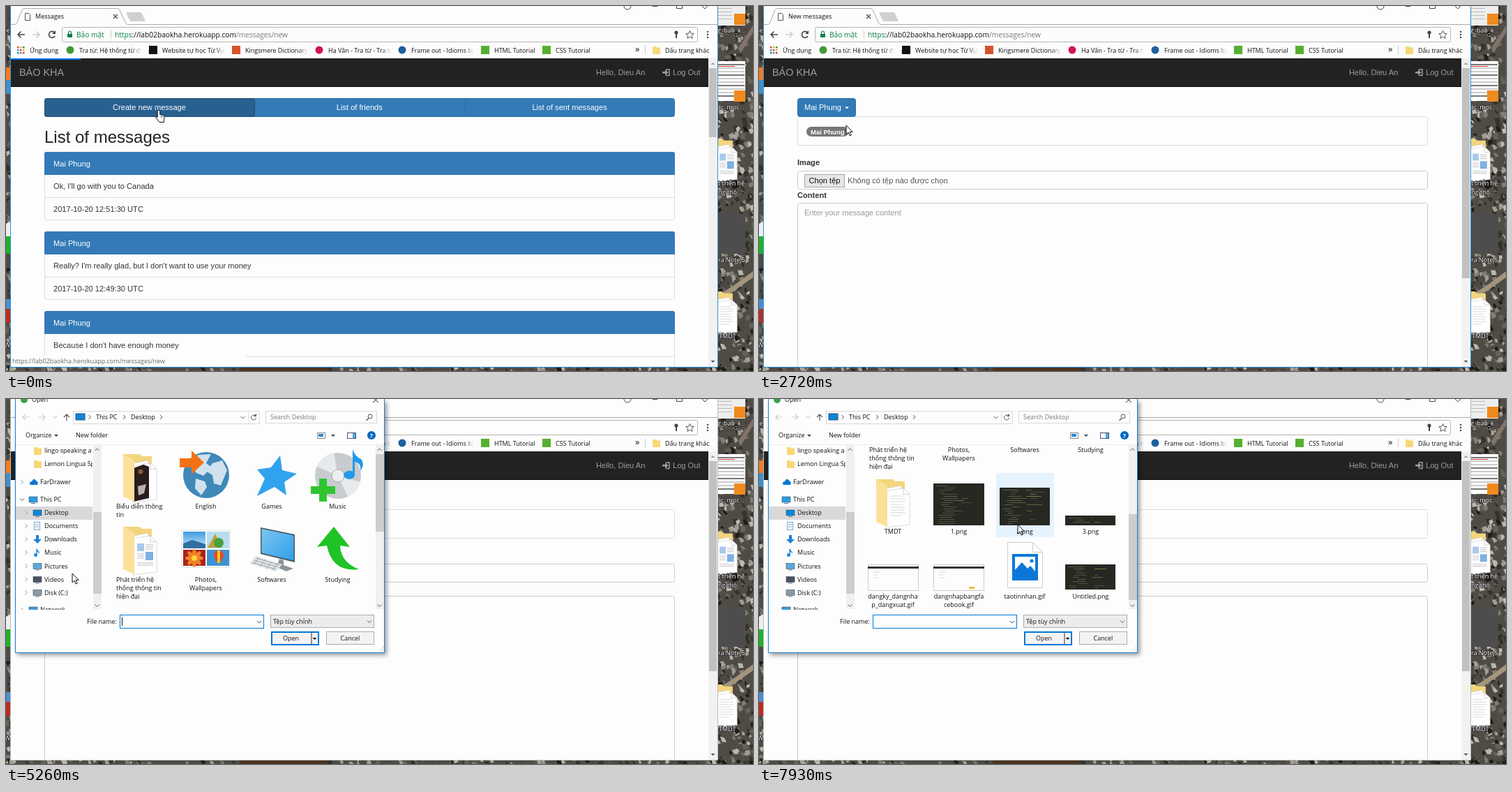
An HTML page for the animation above (8 s loop, 1071x523 px).

```html
<!DOCTYPE html>
<html lang="vi">
<head>
<meta charset="utf-8">
<title>New messages</title>
<style>
html, body { margin: 0; width: 100%; height: 100%; overflow: hidden; background: #fff; }
svg { display: block; width: 1071px; height: 523px; }
text { font: 11.1px "Liberation Sans", Arial, sans-serif; fill: #333; white-space: pre; }
.u { font: 9px "Open Sans", "Noto Sans", sans-serif; fill: #111; }
.url { font-size: 10.2px; }
.b { font-weight: bold; }
.w { fill: #fff; }
.g { fill: #9d9d9d; }
.m { text-anchor: middle; }
.badge { font-size: 9.6px; font-weight: bold; fill: #fff; text-anchor: middle; }
</style>
</head>
<body>
<svg id="stage" viewBox="0 0 1071 523">
  <defs>
    <linearGradient id="fade"><stop stop-color="#fcfcfc" stop-opacity="0"/><stop offset="1" stop-color="#fcfcfc"/></linearGradient>
    <linearGradient id="sky" x2="0" y2="1"><stop stop-color="#3c9be0"/><stop offset="1" stop-color="#cfe8f8"/></linearGradient>
    <linearGradient id="screen" x2="1" y2="1"><stop stop-color="#7cc6f2"/><stop offset="1" stop-color="#2f9fe8"/></linearGradient>
    <filter id="soft" x="-10%" y="-10%" width="120%" height="120%"><feGaussianBlur stdDeviation="3"/></filter>
    <clipPath id="view"><rect x="7" y="75" width="1000" height="442"/></clipPath>
    <clipPath id="tree"><rect x="14" y="66" width="110" height="236"/></clipPath>
    <clipPath id="files"><rect x="138" y="66" width="392" height="235"/></clipPath>
  </defs>
  <g id="base"></g>
  <g id="live"></g>
</svg>
<script>
const PERSON = ['Mai Phung', 'Bao Thinh'];
const BLUE = '#337ab7', DARK = '#286090', PAPER = '#fdfdfd', BAR = '#fcfcfc';

// Drawing helpers
const R = (x, y, w, h, fill, extra = '') => `<rect x="${x}" y="${y}" width="${w}" height="${h}" fill="${fill}" ${extra}/>`;
const box = (x, y, w, h, stroke, fill = PAPER, r = 0) => R(x + .5, y + .5, w - 1, h - 1, fill, `stroke="${stroke}" rx="${r}"`);
const P = (d, stroke, width = 1, fill = 'none') => `<path d="${d}" stroke="${stroke}" stroke-width="${width}" fill="${fill}"/>`;
const F = (d, fill) => `<path d="${d}" fill="${fill}"/>`;
const O = (x, y, r, fill, extra = '') => `<circle cx="${x}" cy="${y}" r="${r}" fill="${fill}" ${extra}/>`;
const T = (x, y, s, cls = '', extra = '') => `<text x="${x}" y="${y}" class="${cls}" ${extra}>${s}</text>`;
const U = (x, y, s, extra) => T(x, y, s, 'u', extra);
const at = (x, y, s, k = 1) => `<g transform="translate(${x} ${y}) scale(${k})">${s}</g>`;
const clip = (id, s) => `<g clip-path="url(#${id})">${s}</g>`;
const down = (x, y, fill) => F(`M${x} ${y}h6l-3 3z`, fill);
const chevron = (x, y, dx, dy, c = '#555') =>
  P(dx ? `M${x - dx} ${y - 3}l${dx * 2} 3l${-dx * 2} 3` : `M${x - 3} ${y - dy}l3 ${dy * 2}l3 ${-dy * 2}`, c);
const times = (n, f) => Array.from({ length: n }, (_, i) => f(i)).join('');
const ramp = (q, a, b) => Math.max(0, Math.min(1, (q - a) / (b - a)));

let seed = 1;
const rnd = n => (seed = seed * 16807 % 2147483647) / 2147483647 * n;
const pick = a => a[Math.floor(rnd(a.length))];

const folder = (x, y, art = '', k = 1) => at(x, y,
  F('M0 0h24l3 3h14v14H0z', '#f3d57c') +
  P('M10 14l26-5v50l-26 6z', '#ccc', .7, '#fff') + P('M14 17l25-4 9 8v44l-34 4z', '#ccc', .7, '#fff') + P('M39 13v9l9-1', '#bbb', .7) +
  art + F('M0 0L16 9V68L0 61z', '#fbe09a'), k);
const report = R(20, 24, 10, 11, '#a9c9ea') + R(32, 36, 11, 12, '#7eb0e2') +
  P('M32 26h11m-11 3h11m-11 3h11M20 39h10m-10 3h10m-10 3h10M20 52h23m-23 3h23', '#aaa', .8);
const plain = P('M20 24h18m-18 4h22m-22 4h22m-22 4h18m-18 4h22m-22 4h20m-20 4h22m-22 4h16', '#ccc', .8);
const photo = F('M15 20l14-5 8 3v45l-22 5z', '#2a1d1c') + O(25, 25, 3.5, '#8b5a3c') + F('M21 46l12-3-3 13-8 3z', '#b9b2ae');

const miniFolder = (x, y) => F(`M${x} ${y}h5l1 1.500h5v9.500h-11z`, '#f8d775');

function desktop() {
  const tones = ['#1f1d1a', '#35312b', '#4d4943', '#66625a', '#827d74', '#a39d92', '#bdb8ae'];
  const chips = (n, x, y, w, h) => times(n, () => {
    const s = 2 + rnd(5);
    return F(`M${x + rnd(w)} ${y + rnd(h)}l${s} ${rnd(6) - 3}l${rnd(4)} ${s}l${-s} ${rnd(4)}z`, pick(tones));
  });
  const label = (x, y, s) => U(x, y, s, 'style="fill:#fff;paint-order:stroke;stroke:#222;stroke-width:1.5px"');
  return R(0, 0, 1071, 523, '#4f4b45') + chips(480, 1016, 0, 55, 523) + chips(60, -3, 0, 8, 523) +
    chips(170, 0, 515, 1071, 6) + R(335, 518, 125, 5, '#4b3520') +
    F('M1021 414q22-12 50-34v9q-28 20-50 35z', '#a3947c') + F('M1050 60l21-32v10l-18 30z', '#81746a') +
    R(1010, 0, 50, 28, '#eee') + times(4, i => R(1021, 3 + i * 5, 20, 1, '#bbb')) + R(1044, 11, 16, 16, '#f08a1d') +
    R(1010, 79, 50, 57, '#fff') + times(10, i => R(1021, 83 + i * 5, 38, 2, i % 3 ? '#ccc' : '#777')) +
    R(1021, 86, 24, 1, '#d33') + R(1044, 121, 16, 16, '#f08a1d') +
    label(1020, 38, 'g_bao_k...') + label(1020, 148, 'ac_moc...') +
    folder(1005, 190, report, .9) + label(1021, 257, 't triển hệ') + label(1021, 270, 'ng thố...') +
    R(1003, 298, 57, 57, '#4d4d4d') + label(1021, 367, 'ra Note 5') +
    folder(1005, 409, plain, .9) + label(1022, 476, 'TMDT') +
    R(0, 88, 7, 18, '#f47b20') + R(0, 106, 7, 20, '#3f8fc9') + F('M0 312l7-4v22h-7z', '#eee') + R(0, 330, 7, 25, '#1fb32a') +
    R(0, 420, 7, 14, '#4c8fd0') + R(0, 434, 7, 20, '#b82e22') +
    label(-5, 38, 'Re') + label(-2, 489, 'W');
}

function browser() {
  const mark = (x, color, end, s, square) =>
    (square ? R(x - 19, 57, 12, 12, color) : O(x - 13, 63, 5.5, color)) + U(x, 66.500, s) +
    (end ? R(end - 14, 56, 14, 14, 'url(#fade)') + R(end, 56, 10, 14, BAR) : '');
  const apps = ['#db4437', '#f4b400', '#0f9d58', '#4285f4'];
  return R(7, 0, 1014, 517, PAPER) + R(7, 27, 1013, 48, BAR) +
    P('M7 26.500h5q3 0 4-3l7-18q1-2 3-2h134q2 0 3 2l8 18q1 3 4 3h845', '#aaa', 1, BAR) +
    F('M172 9h20q2 0 3 2l5 11h-19q-3 0-4-2z', '#d0d0d0') +
    P('M27.500 10.500h5l2 2v8h-7z', '#555') + P('M154 12l6 6m0-6l-6 6', '#444', 1.1) +
    P('M886 0a5 5 0 0 0 10 0M927 .5h7M961.500 0v3.500h8V0M998 0l4 4m4-4l-4 4', '#444') +
    P('M27 41H17m4.500-4.500L17 41l4.500 4.500', '#444', 1.5) + P('M38 41h10m-4.500-4.500L48 41l-4.500 4.500', '#ccc', 1.5) +
    P('M69.500 38A4.500 4.500 0 1 0 70 43', '#444', 1.6) + F('M71 35v5h-5z', '#444') +
    box(80, 30, 912, 22, '#b5b5b5', PAPER, 2) +
    R(88, 40, 7, 5, '#0b8043') + P('M89.500 40v-2a2 2 0 0 1 4 0v2', '#0b8043', 1.2) +
    T(101, 44.500, 'Bảo mật', 'u url', 'style="fill:#0b8043"') + R(150, 35, 1, 12, '#ccc') +
    T(156, 44.500, '<tspan fill="#0b8043">https</tspan>://lab02baokha.herokuapp.com<tspan fill="#777">/messages/new</tspan>', 'u url') +
    O(961, 38, 2.6, '#444') + R(960, 40, 2, 6, '#444') +
    P('M980.500 35.500l1.700 3.700 4 .4-3 2.700.9 4-3.600-2-3.600 2 .9-4-3-2.700 4-.4z', '#555') +
    times(3, i => O(1006, 37 + i * 4, 1.2, '#444')) +
    times(9, i => R(16 + i % 3 * 4, 58 + Math.floor(i / 3) * 4, 2.500, 2.500, apps[i % 4])) + U(34, 66.500, 'Ứng dụng') +
    mark(105, '#3f9a35', 194, 'Tra từ: Hệ thống từ điển') + mark(224, '#111', 314, 'Website tự học Từ Vựng', 1) +
    mark(343, '#d5532b', 433, 'Kingsmere Dictionary', 1) + mark(462, '#d4145a', 552, 'Hạ Vân - Tra từ - Tra từ') +
    mark(581, '#1d5f9e', 671, 'Frame out - Idioms by') + mark(700, '#55b030', 0, 'HTML Tutorial', 1) +
    mark(788, '#55b030', 0, 'CSS Tutorial', 1) + U(902, 66, '»', 'style="font-size:13px"') + R(916, 57, 1, 12, '#ccc') +
    miniFolder(927, 58) + U(945, 66.500, 'Dấu trang khác');
}

function navbar() {
  return R(7, 75, 1000, 41, '#222') + R(7, 115, 1000, 1, '#080808') +
    T(19, 100, 'BẢO KHA', 'g', 'style="font-size:14.4px"') + T(846, 99, 'Hello, Dieu An', 'g') +
    P('M946 91h5v8.500h-5', '#9d9d9d', 1.5) + F('M941 94h4v-3l4.500 4.200-4.500 4.200v-3h-4z', '#9d9d9d') + T(956, 99, 'Log Out', 'g');
}

function listPage() {
  const notes = [
    ["Ok, I'll go with you to Canada", '2017-10-20 12:51:30 UTC'],
    ["Really? I'm really glad, but I don't want to use your money", '2017-10-20 12:49:30 UTC'],
    ["Because I don't have enough money", ''],
  ];
  return box(55, 132, 904, 27, '#2e6da4', BLUE, 3) + box(55, 132, 302, 27, '#204d74', DARK, 3) + R(658, 132, 1, 27, '#2e6da4') +
    ['Create new message', 'List of friends', 'List of sent messages'].map((s, i) => T(205.500 + i * 301.300, 149, s, 'w m')).join('') +
    T(55, 196, 'List of messages', '', 'style="font-size:24px;fill:#222"') +
    notes.map(([text, date], i) => at(55, 209 + i * 114,
      box(0, 0, 904, 98, '#ddd', PAPER, 3) + F('M0 33V3q0-3 3-3h898q3 0 3 3v30z', BLUE) +
      T(13, 20.500, PERSON[0], 'w') + T(13, 53, text) + R(1, 65, 902, 1, '#ddd') + T(13, 85.500, date))).join('');
}

function formPage(count, open, x, y) {
  const label = count ? PERSON[count - 1] : 'List of friends';
  const width = [96, 84, 82][count];
  const hover = open || y > 131 && y < 160 && x < 55 + width;
  const top = count ? 216 : 200;
  const friends = PERSON.slice(count);
  const height = 10 + friends.length * 20.800;
  return box(55, 158, 904, top - 174, '#ddd', PAPER, 3) +
    box(55, 132, width, 27, hover ? '#204d74' : '#2e6da4', hover ? DARK : BLUE, 3) +
    T(65, 149, label, 'w') + down(55 + width - 16, 144.500, '#fff') +
    PERSON.slice(0, count).map((name, i) =>
      R(68 + i * 60.500, 173, 60.500 - i * 1.500, 14, '#777', 'rx="7"') + T(98.200 + i * 59.800, 183.500, name, 'badge')).join('') +
    T(55, top + 12, 'Image', 'b') + box(55, top + 20, 904, 27, '#ccc', PAPER, 3) +
    box(65, top + 25, 58, 19, '#a5a5a5', '#e6e6e6') + T(94, top + 38, 'Chọn tệp', 'm', 'style="fill:#111"') +
    T(127, top + 38, 'Không có tệp nào được chọn', '', 'style="fill:#555"') +
    T(55, top + 58.500, 'Content', 'b') + box(55, top + 66, 904, 249, '#ccc', PAPER, 3) +
    T(65, top + 84, 'Enter your message content', '', 'style="fill:#999"') +
    P(`M951 ${top + 313}l6-6m-3 6l3-3`, '#888') +
    (open ? R(56, 164, 127, height, '#000', 'opacity=".2" filter="url(#soft)"') + box(55, 161, 128, height, '#ccc', PAPER, 3) +
      friends.map((name, i) => {
        const row = 166 + i * 20.800, over = y >= row && y < row + 20.800;
        return (over ? R(56, row, 126, 20.800, '#f0f0f0') : '') + T(72, row + 14, name);
      }).join('') : '');
}

function codeThumb(x, y, w, h) {
  seed = Math.round(x * 7 + y);
  return R(x, y, w, h, '#272822') + times(Math.floor(h / 3) - 1, i =>
    R(x + 4 + rnd(14), y + 3 + i * 3, 6 + rnd(20), 1, pick(['#55564d', '#5f5c40', '#4a5538'])) +
    (rnd(1) < .4 ? R(x + 34 + rnd(10), y + 3 + i * 3, rnd(24), 1, pick(['#4d4d46', '#6a5a42', '#7d7740'])) : ''));
}

function files(x, y, scroll) {
  const cx = [192, 286.500, 381, 475.500];
  const name = (col, row, ...lines) => lines.map((s, i) => T(cx[col], row + i * 12, s, 'u m')).join('');
  const left = (row, ...lines) => lines.map((s, i) => U(158, row + i * 12, s)).join('');
  const shot = x => box(x, 423, 73, 38, '#ccc') + R(x, 426, 73, 3, '#333') + P(`M${x + 8} 434h10m-10 4h6m-6 4h8`, '#ccc', .7);
  const tiles = [2, 3].flatMap(row => cx.map(c => [c - 41, 292 + (row - 2) * 93]));
  const over = scroll > 180 && tiles.find(([a, b]) => x >= a && x < a + 83 && y + scroll >= b && y + scroll < b + 92);
  return (over ? R(over[0], over[1], 83, 92, '#e5f3ff') : '') +
    folder(168, 79, photo) + left(157, 'Biểu diễn thông', 'tin') +
    O(287, 109, 33, '#3f88b8') + F('M262 92l14-12 18-1-7 13 8 6-12 12-10-4zM296 92l14-4 7 14-9 22-10-3-2-12-8-5zM272 114l13 4 3 8-8 12-9-10z', '#cfe2ee') +
    F('M249 85h17v-11l18 17-18 17v-10h-17z', '#f47216') + name(1, 157, 'English') +
    F('M393 81l3 21 21 5-18 12 3 19-17-12-25 13 11-25-11-13 20-3z', '#31a3ee') + name(2, 157, 'Games') +
    O(476, 110, 33, '#c8ccd0') + F('M476 110l-30-13q8-17 24-20zM476 110l32 9q-5 15-18 21z', '#e7eaed') + O(476, 110, 9, '#eee', 'stroke="#aaa"') +
    F('M497 72q3 10 12 14 6 8-1 17 2-11-8-13v20a8 6 0 1 1-3-6z', '#2298e8') +
    F('M449 114h11v11h12v11h-12v11h-11v-11h-12v-11h12z', '#2fc52f') + name(3, 157, 'Music') +
    folder(168, 183, report) + left(262, 'Phát triển hệ', 'thống thông tin', 'hiện đại') +
    R(252, 188, 69, 53, '#fff', 'stroke="#ddd"') + R(254, 190, 32, 24, 'url(#sky)') + F('M254 207l13-5 19 6v6h-32z', '#2f6f9f') +
    R(288, 190, 32, 24, '#b8dcf0') + F('M289 213l11-20 9 20z', '#b9a23a') + O(305, 206, 7, '#48a13a') +
    R(254, 216, 32, 23, '#a82418') + times(8, i => `<ellipse cx="270" cy="221" rx="3" ry="6" fill="#f0822a" transform="rotate(${i * 45} 270 228)"/>`) + O(270, 228, 4, '#ffd23a') +
    R(288, 216, 32, 23, '#3d93d2') + F('M298 225q0-8 7-8t7 8l-5 10h-4z', '#e64a26') + F('M303 217h4v18h-4z', '#f4c526') +
    name(1, 262, 'Photos,', 'Wallpapers') +
    F('M365 184l49 10v40l-49-12z', '#4a5a66') + F('M366.500 186l46 9.500v36l-46-11z', 'url(#screen)') + F('M392 229l6 2v7l14 5-10 4-14-6z', '#8a949b') +
    F('M358 225l38 12-9 10-38-11z', '#e2e4e6') + P('M353 234l34 10m-31-13l34 10m-31-13l34 10M363 227l-8 10m17-7l-8 10m17-7l-8 10m17-8l-8 10', '#8d9499', .8) + name(2, 262, 'Softwares') +
    F('M470 183l23 29-14-2q1 24 27 34-38 5-46-34l-14 2z', '#1fc326') + name(3, 262, 'Studying') +
    folder(168, 301, plain) + name(0, 378.500, 'TMDT') +
    codeThumb(250, 307, 73, 60) + name(1, 378.500, '1.png') + codeThumb(345, 313, 72, 54) + name(2, 378.500, '2.png') +
    codeThumb(439, 353, 72, 14) + name(3, 378.500, '3.png') +
    shot(156) + name(0, 471.500, 'dangky_dangnha', 'p_dangxuat.gif') +
    shot(250) + R(301, 455, 8, 3, '#f0c040') + name(1, 471.500, 'dangnhapbangfa', 'cebook.gif') +
    P('M356.500 391.500h36l14 14v51h-50zM392.500 391.500v14h14', '#ccc', 1, '#fff') +
    R(365, 410, 33, 34, '#fff', 'stroke="#0b78d8" stroke-width="4"') + F('M367 442v-11l10-11 8 9 4-4 7 8v9z', '#0b78d8') + O(391, 418, 2.5, '#0b78d8') +
    name(2, 471.500, 'taotinnhan.gif') + codeThumb(439, 423, 72, 36) + name(3, 471.500, 'Untitled.png');
}

function dialog(q, x, y) {
  const scroll = 186 * ramp(q, 5760, 6190);
  const arrows = 1 - ramp(q, 6320, 6580);
  const caret = Math.floor((q - 5250) / 530) % 2 === 0;
  const rows = [[119, 49, 'FarDrawer', '#0a78d0'], [144, 49, 'This PC', '#2a9be6'], [163, 55, 'Desktop', '#0b86dc'], [182, 55, 'Documents', '#7aa7cc'],
    [201, 55, 'Downloads', '#1f7fd6'], [220, 55, 'Music', '#1f8be0'], [239.500, 55, 'Pictures', '#5aa9dc'], [258.500, 55, 'Videos', '#4a4f63'],
    [277.500, 55, 'Disk (C:)', '#8a98a3'], [302, 49, 'Network', '#3b9ad8']];
  const icon = (s, x, y, c) => s === 'Downloads' ? F(`M${x + 4} ${y - 6}h4v6h4l-6 6-6-6h4z`, c)
    : s === 'Music' ? P(`M${x + 5} ${y + 3}v-8q1 4 4 5`, c, 1.500) + O(x + 3.500, y + 3.500, 2.500, c)
    : s === 'FarDrawer' ? F(`M${x + 2} ${y + 4}q-3-4 2-5 3-6 6-1 4 1 2 6z`, c)
    : s === 'Documents' ? box(x + 1, y - 6, 9, 12, c) + P(`M${x + 3} ${y - 2}h5m-5 3h5`, c)
    : R(x, y - 4, 12, 8, c, 'stroke="#456" stroke-width=".6"') + R(x + 3, y + 5, 6, 1, '#678');
  const tree = R(14, 154, 110, 19, '#d9d9d9') + miniFolder(40, 69) + U(55, 77.200, 'lingo speaking a') + miniFolder(40, 88) + U(55, 96.200, 'Lemon Lingua Sp') +
    rows.map(([ry, rx, s, c]) => U(rx, ry + 3.200, s) + icon(s, rx - 16, ry, c) +
      `<g opacity="${arrows}">${s === 'This PC' ? chevron(23, ry, 0, 1.500) : chevron(rx === 49 ? 23 : 29, ry, 1.500, 0, '#999')}</g>`).join('');
  const bar = (x, top, h) => R(x, 66, 12, 235, '#f0f0f0') + R(x, top, 12, h, '#cdcdcd') + chevron(x + 5.500, 72.500, 0, -1.500) + chevron(x + 5.500, 296, 0, 1.500);
  return R(16, 4, 530, 363, '#000', 'opacity=".4" filter="url(#soft)"') + box(13, -2, 530, 366, '#1883d7') +
    O(26, 1, 5, '#3da14e') + U(37, 4.200, 'Open') + P('M526-2l8 7m0-7l-8 7', '#333') +
    P('M33 26H24m4-4l-4 4 4 4M47 26h9m-4-4l4 4-4 4', '#ccc', 1.200) + chevron(70.500, 26, 0, 1, '#bbb') + P('M87 31v-9m-4 4l4-4 4 4', '#555', 1.200) +
    box(96, 17, 268, 19, '#d9d9d9') + R(100, 21, 13, 9, '#0b86dc', 'stroke="#357"') +
    chevron(120, 26, 1.500, 0) + U(129, 29, 'This PC') + chevron(169.500, 26, 1.500, 0) + U(179, 29, 'Desktop') + chevron(222.500, 26, 1.500, 0) +
    chevron(339.500, 26.500, 0, 1.500) + R(347, 18, 1, 17, '#ddd') + P('M357.500 24a3.500 3.500 0 1 0 1 3', '#555') + F('M359 21v4h-4z', '#555') +
    box(372, 17, 160, 18, '#d9d9d9') + U(379, 29, 'Search Desktop', 'style="fill:#777"') + O(522, 25, 3, 'none', 'stroke="#555"') + P('M520 27.500l-3.500 3.500', '#555', 1.300) +
    U(28, 55.200, 'Organize') + down(69, 51, '#345') + U(100, 55.200, 'New folder') +
    box(446, 48, 12, 9, '#888') + R(448, 50, 7, 4, '#2b86cf') + down(466, 51, '#345') +
    box(489, 48, 13, 9, '#457') + R(497, 49, 4, 7, '#58a5de') + O(524, 52, 6, '#0067c0') + T(524, 55.500, '?', 'u m b w', 'style="fill:#fff"') +
    R(14, 65, 528, 1, '#eee') + clip('tree', tree) + bar(125, 162, 117) +
    clip('files', at(0, -scroll, files(x, y, scroll))) + bar(530, 79 + scroll * 86 / 186, 111 + scroll * 12 / 186) +
    U(116, 322, 'File name:') + box(163, 309, 207, 20, '#0078d7') + chevron(363, 319.500, 0, 1.500) + (caret ? R(166, 313, 1, 12, '#111') : '') +
    box(379, 309, 149, 19, '#adadad', '#ececec') + U(383, 322, 'Tệp tùy chỉnh') + chevron(521, 319, 0, 1.500) +
    R(381, 334, 67, 18, '#f3f3f3', 'stroke="#0078d7" stroke-width="2"') + T(408.500, 346, 'Open', 'u m') + R(437.500, 335, 1, 16, '#333') + down(439.500, 342, '#111') +
    box(459, 333, 69, 19, '#adadad', '#f3f3f3') + T(493.500, 346, 'Cancel', 'u m') +
    times(3, i => times(i + 1, j => R(540 - j * 3, 355 + i * 3, 1, 1, '#999')));
}

function cursor(x, y, hand) {
  return at(x, y, hand
    ? P('M-1.700 1.500q1.700-2.500 3.400 0V6.500l5 1.100q2 .6 1.700 2.800l-1 4.500V17.500H1L-3.800 11.500q-1.200-2.400.7-2.200l1.400 1.200z', '#111', 1, '#fff') + P('M3.500 8v3m2.500-2.500v3', '#333', .8)
    : P('M0 0V13l3-2.800 2.200 4.800 2-.9-2.200-4.700h4.200z', '#111', 1, '#fff'));
}

const moments = [[140, 1120, 8], [1260, 1500, 3], [1640, 1770, 2], [2180, 2720, 5], [2870, 3140, 3], [3390, 3700, 3], [4130, 4400, 3],
  [4540, 4980, 4], [5260, 5760, 5], [5890, 6190, 3], [6320, 6580, 3], [6700, 7240, 5], [7390, 7930, 5]]
  .flatMap(([a, b, n]) => Array.from({ length: n }, (_, i) => a + (b - a) * i / (n - 1)));

// Pointer path: time, x, y
const path = [[0, 219, 149], [420, 219, 149], [1260, 140, 155], [1500, 134, 156], [2180, 134, 156], [2450, 116, 172], [2720, 125, 171],
  [3140, 118, 152], [3390, 118, 152], [3700, 112, 172], [4130, 112, 172], [4400, 130, 224], [4680, 95, 250], [5260, 95, 250],
  [5630, 276, 200], [6320, 276, 200], [6580, 349, 207], [6835, 355, 185], [7105, 366, 222], [7390, 373, 224], [7660, 372, 192], [7930, 371, 180], [8000, 371, 180]];

function pointer(q) {
  const i = path.findIndex(p => p[0] > q);
  const [t0, x0, y0] = path[i - 1], [t1, x1, y1] = path[i];
  const k = (q - t0) / (t1 - t0);
  return [Math.round(x0 + (x1 - x0) * k), Math.round(y0 + (y1 - y0) * k)];
}

function frame(q) {
  const [x, y] = pointer(q);
  const list = q < 420, count = q < 2450 ? 0 : q < 4130 ? 1 : 2;
  const open = q >= 1640 && q < 2450 || q >= 3390 && q < 4130;
  const inactive = q > 4800, picking = q >= 5260;
  const hand = list || open || !picking && y > 131 && y < 160 && x < [151, 139, 137][count];
  return P('M6.500 0V517.500H1020.500V0', inactive ? '#b5bcc2' : '#2f8fd8') +
    U(42, 18.200, list ? 'Messages' : 'New messages') +
    clip('view', R(7, 75, 1000, 442, PAPER) + navbar() + (list ? listPage() : formPage(count, open, x, y)) +
      (q < 560 ? R(7, 75, list ? 100 + q * .6 : 1000, 2, '#0076ff') : '') +
      (q < 1380 ? R(7, 501, 337, 16, PAPER) + U(9, 512, 'https://lab02baokha.herokuapp.com/messages/new', 'style="fill:#666"') : '')) +
    R(1007, 75, 13, 442, '#f1f1f1') + R(1008, 89, 11, list ? 99 : count ? 301 : 309, '#c1c1c1') +
    F('M1010.500 84h6l-3-3z', '#a3a3a3') + down(1010.500, 508, '#505050') +
    (picking ? dialog(q, x, y) : '') + cursor(x, y, hand);
}

const live = document.getElementById('live');
document.getElementById('base').innerHTML = desktop() + browser();
let shown = -1;
function tick() {
  const t = performance.now() % 8000;
  const q = moments.reduce((last, m) => m <= t ? m : last, 0);
  if (q !== shown) live.innerHTML = frame(shown = q);
  requestAnimationFrame(tick);
}
tick();
</script>
</body>
</html>
```
